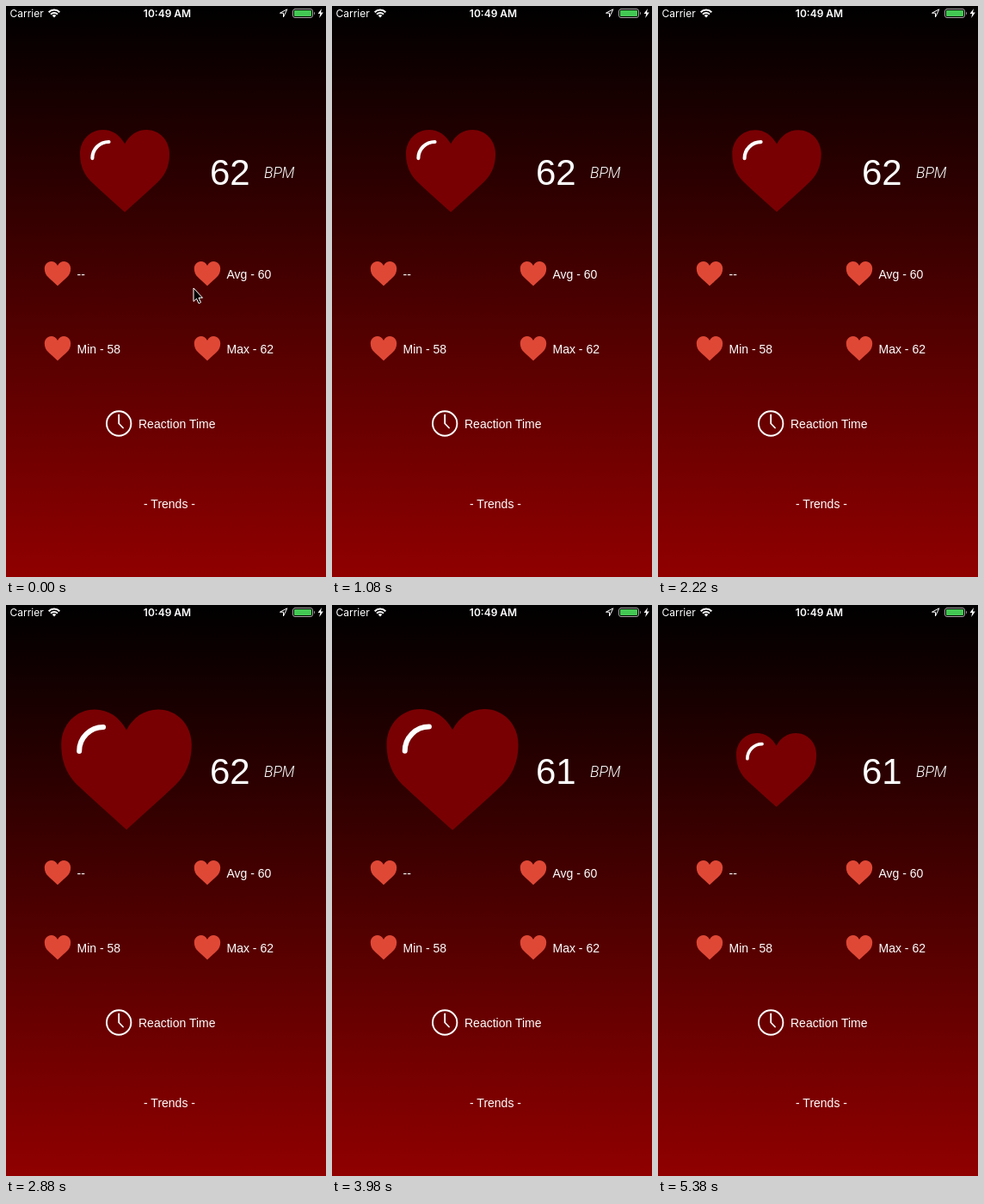
An HTML page for the animation above (5400 ms loop, 372 by 664 pixels).

```html
<!DOCTYPE html>
<html lang="en">
<head>
<meta charset="utf-8">
<title>Heart rate</title>
<style>
  html, body { margin: 0; width: 100%; height: 100%; overflow: hidden; background: #000; }
  svg { display: block; width: 372px; height: 664px; }
  text { fill: #fff; font: 14px "Liberation Sans", Arial, sans-serif; }
  .bar text { font: 12px Inter, sans-serif; }
  .bar .time { font-weight: 600; }
  #bpm { font-size: 42px; }
  .unit { font: italic 300 17.5px Roboto, sans-serif; }
  .line { fill: none; stroke: #fff; stroke-linecap: round; stroke-linejoin: round; }
</style>
</head>
<body>
<svg viewBox="0 0 372 664">
  <defs>
    <linearGradient id="bg" x2="0" y2="1">
      <stop stop-color="#000"/>
      <stop offset="1" stop-color="#900000"/>
    </linearGradient>
    <path id="heart" d="M0 24C-8 9-21 0-37 0C-59 0-76 18-76 41C-76 64-67 79-55 90Q-48 97 0 140Q48 97 55 90C67 79 76 64 76 41C76 18 59 0 37 0C21 0 8 9 0 24Z"/>
  </defs>
  <rect width="372" height="664" fill="url(#bg)"/>

  <g class="bar">
    <text x="4.5" y="13">Carrier</text>
    <g class="line" stroke-width="2" style="stroke-linecap:butt">
      <path d="M49.700 7.200A8.700 8.700 0 0 1 62.300 7.200M52 9.600A5.600 5.600 0 0 1 60 9.600"/>
    </g>
    <path d="M56 13.500L53.700 11.100A3.400 3.400 0 0 1 58.300 11.100Z" fill="#fff"/>
    <text class="time" x="187.5" y="13" text-anchor="middle">10:49 AM</text>
    <path class="line" d="M326.500 4L318.500 8.200H322.500V12.500Z"/>
    <rect class="line" x="333.500" y="3.500" width="23" height="10" rx="2.500" style="stroke:#a5a5a5"/>
    <rect x="335" y="5" width="20" height="7" rx="1" fill="#43c853"/>
    <path d="M358 6.500Q360 8.500 358 10.500Z" fill="#a5a5a5"/>
    <path d="M367 3L362.500 9H365.300L364.200 14L368.800 7.500H366Z" fill="#fff"/>
  </g>

  <g id="pulse">
    <use href="#heart" fill="#780003"/>
    <path class="line" stroke-width="6" d="M-55 48.500A28 28 0 0 1-27 20.500"/>
  </g>
  <text id="bpm" x="237" y="208">62</text>
  <text class="unit" x="300" y="199.500">BPM</text>

  <g id="stats"></g>

  <circle class="line" cx="131.200" cy="485.500" r="14.200" stroke-width="1.900"/>
  <path class="line" stroke-width="1.800" d="M131.200 475.500V485.500L136 490.500"/>
  <text x="154" y="491">Reaction Time</text>
  <text x="190" y="584" text-anchor="middle">- Trends -</text>

  <path id="cursor" d="M218 328V343.500L221.500 340.300L224 345.800L226.500 344.700L224 339.300H228.500Z" fill="#000" stroke="#fff"/>
</svg>
<script>
const $ = id => document.getElementById(id);

const stat = (x, y, label) => `
  <use href="#heart" fill="#e04836" transform="translate(${x} ${y}) scale(.2 .204)"/>
  <text x="${x + 22.5}" y="${y + 20}">${label}</text>`;
$('stats').innerHTML = stat(60, 297, '--') + stat(234, 297, 'Avg - 60') +
  stat(60, 384, 'Min - 58') + stat(234, 384, 'Max - 62');

// [ms, phase]: even phases are the smallest heart, odd ones the largest.
const beats = [[0, -.295], [1080, 1.705], [1660, 2.705], [2880, 4.9],
  [3980, 7], [4780, 8.705], [5400, 9.95]];

function phaseAt(t) {
  const i = beats.findIndex(b => b[0] > t);
  const [t0, p0] = beats[i - 1], [t1, p1] = beats[i];
  return p0 + (p1 - p0) * (t - t0) / (t1 - t0);
}

const start = performance.now();
function draw() {
  const t = (performance.now() - start) % 5400;
  const width = 92 + 61 * (1 - Math.cos(Math.PI * phaseAt(t))) / 2;
  const scale = width / 152;
  const x = 133.7 + .0417 * width;
  const y = 192.7 - .0085 * width - 70 * scale;
  $('pulse').setAttribute('transform', `translate(${x} ${y}) scale(${scale})`);
  $('bpm').textContent = t < 3460 ? 62 : 61;
  $('cursor').style.display = t < 500 ? '' : 'none';
  requestAnimationFrame(draw);
}
draw();
</script>
</body>
</html>
```
